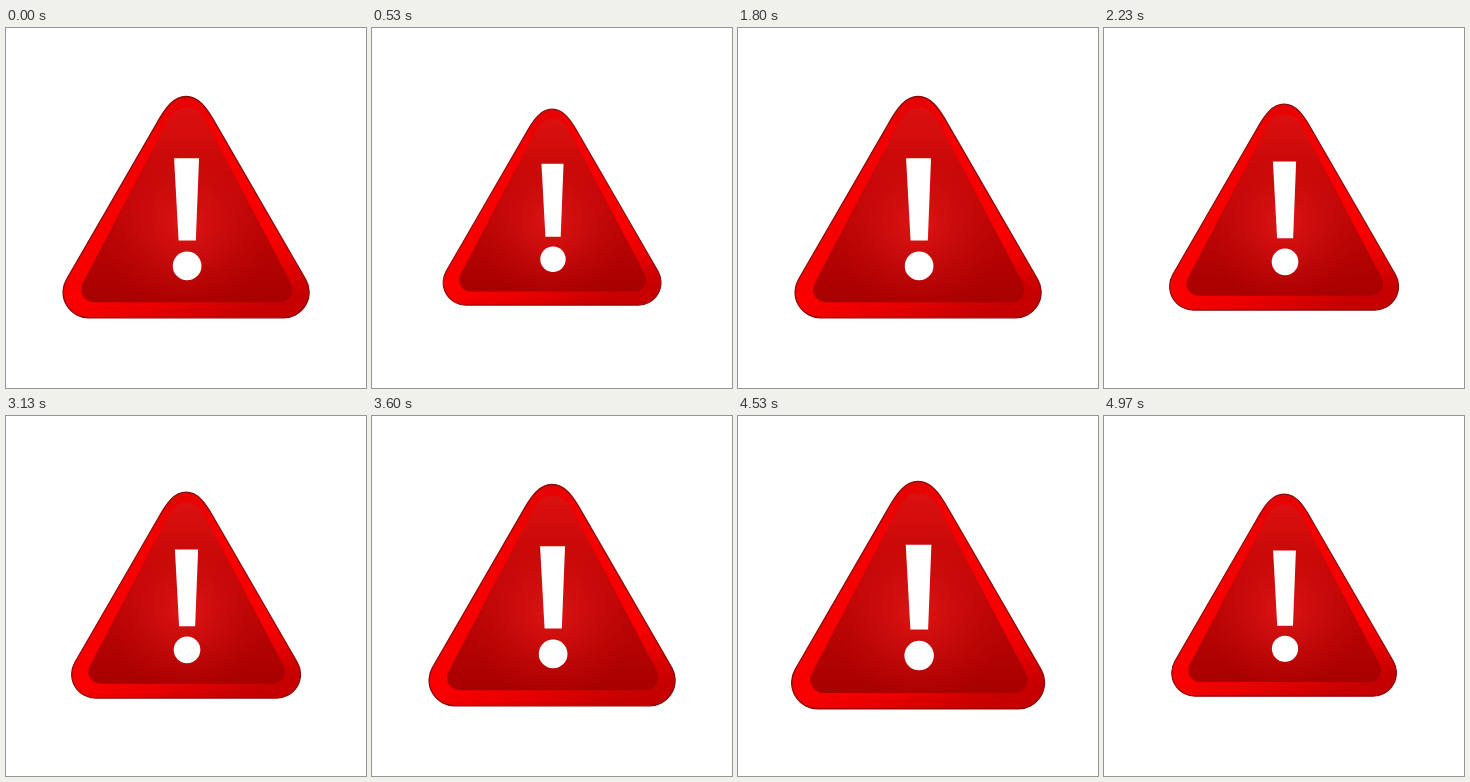
An HTML page for the animation above (5.01 s loop, 360 by 360 pixels).

```html
<!DOCTYPE html>
<html lang="en">
<head>
<meta charset="utf-8">
<title>Pulsing warning sign</title>
<style>
  html, body { margin: 0; width: 100%; height: 100%; overflow: hidden; background: #fff; }
  svg { display: block; width: 100vw; height: 100vh; }
</style>
</head>
<body>
<svg viewBox="0 0 360 360">
  <defs>
    <linearGradient id="rim" x1=".3" y1="0" x2=".7" y2="1">
      <stop offset=".05" stop-color="#e20404"/>
      <stop offset=".22" stop-color="#f40000"/>
      <stop offset=".72" stop-color="#fa0000"/>
      <stop offset=".84" stop-color="#ea0000"/>
      <stop offset="1" stop-color="#c60000"/>
    </linearGradient>
    <linearGradient id="face" x1="0" y1="0" x2="0" y2="1">
      <stop offset="0" stop-color="#dc1010"/>
      <stop offset=".3" stop-color="#ca0808"/>
      <stop offset="1" stop-color="#a80000"/>
    </linearGradient>
    <radialGradient id="glow" gradientUnits="userSpaceOnUse" cx="180" cy="196" r="88">
      <stop offset="0" stop-color="#e01616" stop-opacity=".95"/>
      <stop offset=".4" stop-color="#d41010" stop-opacity=".65"/>
      <stop offset="1" stop-color="#c40808" stop-opacity="0"/>
    </radialGradient>
    <path id="panel"
      d="M159.5 98C166 85 172 80 181 80S196 85 202.5 98L284.8 255A13 13 0 0 1 273.5 274.3H88.5A13 13 0 0 1 77.2 255Z"/>
  </defs>
  <g id="sign">
    <path fill="url(#rim)" stroke="#8c0a0a" stroke-width="1.3"
      d="M150 97.5C160 79.5 168 69 180.3 69S200.6 79.5 210.6 97.5L299.6 251.5A25.5 25.5 0 0 1 277.5 289.7H83.1A25.5 25.5 0 0 1 61 251.5Z"/>
    <use href="#panel" fill="url(#face)"/>
    <use href="#panel" fill="url(#glow)"/>
    <path fill="#fff" d="M168.3 130.5H193.2L190 212.7H172.8Z"/>
    <circle fill="#fff" cx="181.3" cy="238" r="14.3"/>
  </g>
</svg>
<script>
  const LOOP = 5010, LAST = 149;
  const BEAT = 27, HALF = BEAT / 2, PEAK = 4.5;   // in steps of 1/30 s
  const BASE = 247, MIN = 215.7, SWING = 67.7;    // sign widths in px
  const sign = document.getElementById("sign");

  // Quick swell to a sharp peak, then a decelerating fall.
  function widthAt(step) {
    const p = (step - PEAK + BEAT) % BEAT;
    const level = p < HALF
      ? Math.pow(1 - p / HALF, 1.54)
      : Math.pow(p / HALF - 1, 1.85);
    return MIN + SWING * level;
  }

  function draw(now) {
    const t = now % LOOP;
    const step = Math.min(LAST, Math.floor((Math.floor(t / 10) + 0.5) * 0.3));
    const scale = widthAt(step) / BASE;
    sign.setAttribute("transform",
      `translate(180 179.1) scale(${scale}) translate(-180.2 -179.3)`);
  }

  const start = performance.now();
  function tick() {
    draw(performance.now() - start);
    requestAnimationFrame(tick);
  }
  tick();
</script>
</body>
</html>
```
